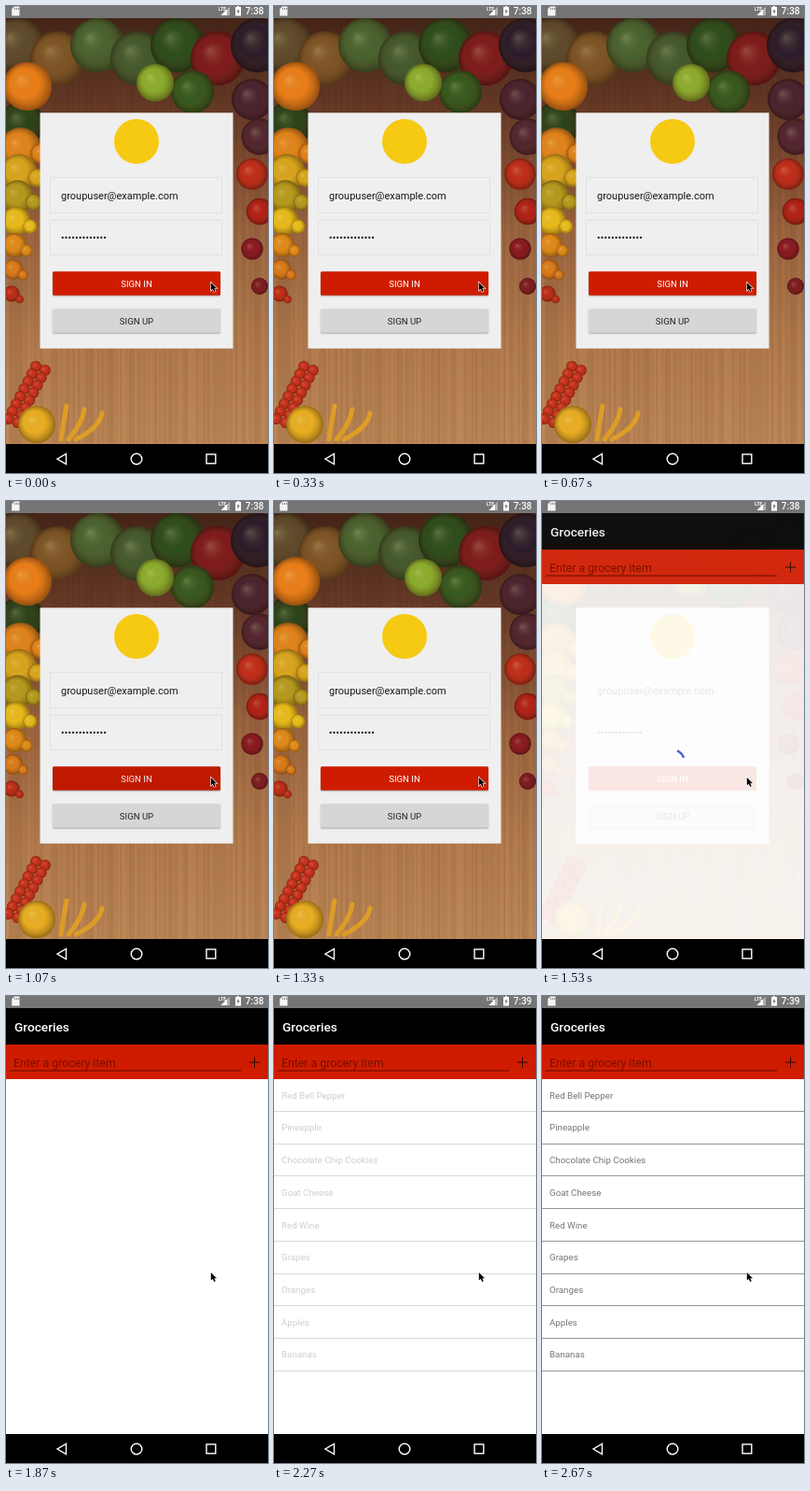
An HTML page with a canvas that plays this animation: 281 px wide and 500 px high, repeating every 2740 ms.

```html
<!DOCTYPE html>
<html lang="en">
<head>
<meta charset="utf-8">
<title>Groceries</title>
<style>
html, body { margin: 0; width: 100%; height: 100%; overflow: hidden; background: #000; }
canvas { display: block; width: 281px; height: 500px; }
</style>
</head>
<body>
<canvas id="stage" width="281" height="500"></canvas>
<script>
const ctx = document.getElementById('stage').getContext('2d');
const LOOP = 2740, STEP = 200 / 3;
const RED = '#cf1c00';
const ITEMS = ['Red Bell Pepper', 'Pineapple', 'Chocolate Chip Cookies', 'Goat Cheese',
  'Red Wine', 'Grapes', 'Oranges', 'Apples', 'Bananas'];

// Heaps of produce along the top, down the left edge and down the right edge.
const TOP = ['#5d4a2c', '#7d5426', '#48622f', '#43592e', '#2c4d1c', '#7e1a1c', '#2b1b2a'];
const LEFT = ['#2b421a', '#e0831a', '#d9a51c', '#b59a1d', '#e8bb1a', '#e08a18', '#d9791a', '#bd2c17'];
const RIGHT = ['#4a2230', '#522531', '#c02c1a', '#b22017', '#8a1722', '#7d1a20'];

const ramp = (t, from, to) => Math.min(1, Math.max(0, (t - from) / (to - from)));
const smooth = x => x * x * (3 - 2 * x);

function random(seed) {
  return () => (seed = (seed * 16807) % 2147483647) / 2147483647;
}

function rect(x, y, w, h, color) {
  ctx.fillStyle = color;
  ctx.fillRect(x, y, w, h);
}

function disc(x, y, r, color) {
  ctx.fillStyle = color;
  ctx.beginPath();
  ctx.arc(x, y, r, 0, 7);
  ctx.fill();
}

function text(str, x, y, size, color, weight = 400, align = 'left') {
  ctx.font = `${weight} ${size}px Roboto, sans-serif`;
  ctx.textAlign = align;
  ctx.fillStyle = color;
  ctx.fillText(str, x, y);
}

function shape(path, fill, stroke, width) {
  const p = new Path2D(path);
  if (stroke) {
    ctx.strokeStyle = stroke;
    ctx.lineWidth = width;
    ctx.stroke(p);
  }
  if (fill) {
    ctx.fillStyle = fill;
    ctx.fill(p);
  }
}

function faded(alpha, draw) {
  if (alpha <= 0) return;
  ctx.save();
  ctx.globalAlpha = alpha;
  draw();
  ctx.restore();
}

function fruit(x, y, r, color) {
  const shade = ctx.createRadialGradient(x - r * 0.3, y - r * 0.3, 0, x, y, r);
  shade.addColorStop(0, 'rgba(255,255,190,.22)');
  shade.addColorStop(0.55, 'rgba(120,80,30,0)');
  shade.addColorStop(1, 'rgba(20,5,0,.4)');
  disc(x, y, r, color);
  disc(x, y, r, shade);
}

function table() {
  const wood = ctx.createLinearGradient(0, 13, 0, 469);
  ['#452519', '#6d3f2a', '#9c6641', '#b37c4e', '#be8958']
    .forEach((c, i) => wood.addColorStop(i / 4, c));
  rect(0, 13, 281, 456, wood);

  const rnd = random(41);
  for (let x = 0; x < 281; x += 2) rect(x, 13, 2, 456, `rgba(60,25,8,${0.12 * rnd()})`);

  TOP.forEach((c, i) => fruit(12 + i * 43, 42 + (i % 2) * 14, 29, c));
  LEFT.forEach((c, i) => {
    const r = 24 - i * 2.2;
    fruit(r * 0.7, 126 + i * 26, r, c);
    if (i) fruit(r * 1.7, 132 + i * 26, r * 0.5, c);
  });
  RIGHT.forEach((c, i) => fruit(264 + (i % 2) * 8, 100 + i * 40, 22 - i * 2.6, c));
  fruit(200, 92, 23, '#35591f');
  fruit(23, 86, 26, '#ea7e18');
  fruit(160, 82, 20, '#8bad2d');

  for (let i = 0; i < 16; i++) fruit(38 - i * 2.1 + (i % 2 ? 6 : -6), 386 + i * 4, 6, '#c8301c');
  fruit(33, 448, 20, '#e9ae22');
  ctx.lineCap = 'round';
  for (let i = 0; i < 3; i++) {
    shape(`M${65 + i * 19} ${428 + i * 4} q-3 16 ${-6 - i * 11} ${36 - i * 4}`, null, '#dd9d25', 5);
  }
}

function button(label, y, fill, color) {
  ctx.save();
  ctx.shadowColor = 'rgba(0,0,0,.3)';
  ctx.shadowBlur = 1.5;
  ctx.shadowOffsetY = 1;
  ctx.fillStyle = fill;
  ctx.beginPath();
  ctx.roundRect(50, y, 180, 25.5, 1.5);
  ctx.fill();
  ctx.restore();
  text(label, 140, y + 16.4, 9.6, color, 400, 'center');
}

function field(y, h) {
  ctx.strokeStyle = '#e2e2e2';
  ctx.lineWidth = 1;
  ctx.strokeRect(47.5, y + 0.5, 184, h);
}

function loginPage(t) {
  table();
  rect(36.5, 114.3, 207, 252.4, '#efefef');
  disc(140, 145, 24, '#f6c913');
  field(183, 38);
  field(229, 37);
  text('groupuser@example.com', 59, 207, 11, '#181818');
  for (let i = 0; i < 13; i++) disc(60.7 + i * 3.78, 248, 1.15, '#181818');
  button('SIGN IN', 284.3, RED, '#fff');
  const press = ramp(t, 1000, 1060) * (1 - ramp(t, 1200, 1330));
  rect(50, 284.3, 180, 25.5, `rgba(0,0,0,${0.08 * press})`);
  button('SIGN UP', 324.3, '#d6d6d6', '#222');
}

function header() {
  rect(0, 13, 281, 39, '#000');
  text('Groceries', 9, 38, 13.7, '#fff', 500);
  rect(0, 52, 281, 37, RED);
  text('Enter a grocery item', 8, 75.5, 12.3, '#780f00');
  rect(4, 79.5, 248, 1, '#5f0c00');
  rect(261, 70.5, 11, 1, '#300600');
  rect(266, 65.5, 1, 11, '#300600');
}

function list() {
  ITEMS.forEach((item, i) => {
    const y = 106 + i * 34.7;
    text(item, 8, y + 3.7, 9.75, '#757575');
    rect(0, Math.round(y + 17), 281, 1, '#969696');
  });
}

function spinner(t) {
  const age = t - 1388;
  if (age < 0 || t > 1800) return;
  const start = (age * 0.175 - 92) * Math.PI / 180;
  const sweep = 0.05 + 1.5 * Math.PI * smooth(ramp(age, 0, 560));
  ctx.strokeStyle = '#4c5fd3';
  ctx.lineWidth = 2.4;
  ctx.lineCap = 'butt';
  ctx.beginPath();
  ctx.arc(140, 279, 12.6, start, start + sweep);
  ctx.stroke();
}

function statusBar(t) {
  rect(0, 0, 281, 13, '#757575');
  shape('M9 .5H14.5V10.5H6.2V3.2Z', '#f4f4f4');
  for (let x = 9; x < 14; x += 2) rect(x, 2, 1, 2, '#858585');
  shape('M240 .5V10H230.5Z', '#b0b0b0');
  shape('M237 3.5V10H230.5Z', '#fff');
  text('LTE', 228, 4.5, 5, '#fff', 700);
  shape('M246 1h2v-1h2v1h2v9.5h-6Z', '#fff');
  shape('M249.5 2.5l-2.2 3.7h1.5l-.4 2.8 2.4-4h-1.6Z', '#757575');
  text(t < 2200 ? '7:38' : '7:39', 276.5, 9, 10, '#fff', 500, 'right');
}

function navBar() {
  rect(0, 469, 281, 31, '#000');
  shape('M64.5 479.5v11l-9.5-5.5Z', null, '#fff', 1.4);
  ctx.beginPath();
  ctx.arc(140, 485, 5.8, 0, 7);
  ctx.stroke();
  ctx.strokeRect(215, 480, 9.8, 9.8);
}

function cursor() {
  shape('M219.8 296v8.6l2-1.8 1.4 3.2 1.5-.7-1.4-3.1h2.7Z', '#000', '#fff', 1.2);
}

function draw(t) {
  const fade = ramp(t, 1338, 1556);
  if (fade < 1) loginPage(t);
  faded(fade, () => rect(0, 13, 281, 456, '#fff'));
  faded(ramp(fade, 0.22, 0.94), header);
  faded(smooth(ramp(t, 2000, 2660)), list);
  spinner(t);
  statusBar(t);
  navBar();
  cursor();
}

// The picture advances like a screen recording, 15 steps a second.
function tick() {
  const now = performance.now() % LOOP;
  draw(Math.min(40, Math.floor((now + 5) / STEP)) * STEP);
  requestAnimationFrame(tick);
}
tick();
</script>
</body>
</html>
```
